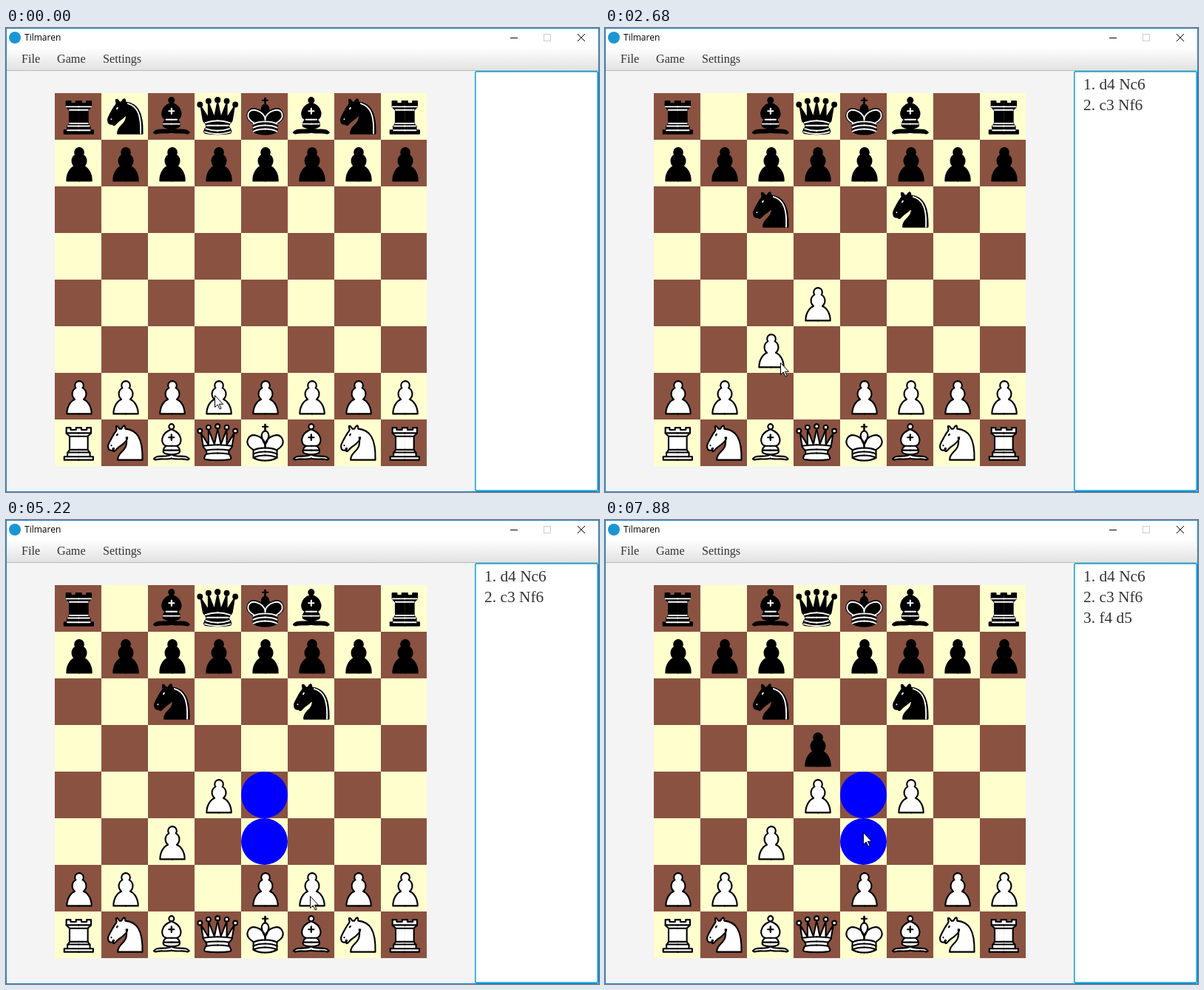
These frames come from a looping animation (802 by 627 pixels, 8 s). An HTML page:

```html
<!DOCTYPE html>
<html lang="en">
<head>
<meta charset="utf-8">
<title>Chess</title>
<style>
  html, body { margin: 0; width: 100%; height: 100%; overflow: hidden; background: #f4f4f4; }
  svg { display: block; }
  .title { font: 12px "Open Sans", sans-serif; }
  .menu { font: 16.2px "Liberation Serif", serif; fill: #333; }
  .moves { font: 21.4px "Liberation Serif", serif; fill: #333; }
  .piece { stroke: #000; stroke-width: 1.45; stroke-linecap: round; stroke-linejoin: round; }
  .white { fill: #fff; }
  .black { fill: #000; }
  .detail { fill: none; }
  .black .detail { stroke: #fff; stroke-width: 1.3; }
</style>
</head>
<body>
<svg width="802" height="627">
  <defs>
    <linearGradient id="bar" x2="0" y2="1">
      <stop stop-color="#fdfdfd"/><stop offset="1" stop-color="#e2e2e2"/>
    </linearGradient>
  </defs>
  <rect width="802" height="28" fill="#fff"/>
  <circle cx="12" cy="13" r="8" fill="#1b96d1"/>
  <text class="title" x="25" y="17">Tilmaren</text>
  <path d="M682 13.5h10M773 8l10 10m0-10l-10 10" stroke="#000"/>
  <rect x="727.5" y="8.5" width="9" height="9" fill="none" stroke="#ccc"/>
  <rect y="28" width="802" height="29" fill="url(#bar)"/>
  <rect y="57" width="802" height="1" fill="#b8b8b8"/>
  <g class="menu">
    <text x="21" y="47">File</text><text x="69" y="47">Game</text><text x="131" y="47">Settings</text>
  </g>
  <rect x="634.7" y="58.7" width="165.6" height="566.6" rx="2" fill="#fff" stroke="#039ed3" stroke-width="1.4"/>
  <rect x="636" y="60" width="163" height="564" fill="none" stroke="#039ed3" stroke-opacity=".13"/>
  <rect x=".5" y=".5" width="801" height="626" fill="none" stroke="#1883d7"/>
  <g id="board" shape-rendering="crispEdges"></g>
  <g id="pieces"></g>
  <g id="hints" fill="#00f"></g>
  <g id="moves" class="moves"></g>
  <path id="cursor" d="M.5.5v16l3.7-3.5 2.9 6 2-1-2.7-5.7h5.1z" fill="#fff" stroke="#000"/>
</svg>
<script>
const CELL = 63, LEFT = 66, TOP = 88, LOOP = 8000, FILES = 'abcdefgh';

const ball = (x, y) => `M${x - 2} ${y}a2 2 0 1 1 4 0 2 2 0 1 1-4 0z`;
const turret = 'M11 14h11.6M14 17h8.6M14 29.5h8.6M12.5 32h10.1M12 36h10.6';
const collar = 'M17.5 26h5.1M15 30h7.6M22.5 15.5v5M20 18h2.6';
const band = 'c3-1.5 7-2.2 11.1-2.2';
const bands = `M11.5 30${band}M11.5 33.5${band}M11.5 37${band}`;

// Left halves on a 45-unit square, mirrored when drawn; only the knight is whole.
const shapes = {
  p: { dx: 0, body: 'M22.6 9c-2.3 0-4.1 1.8-4.1 4 0 .9.3 1.7.8 2.4C17.3 16.5 16 18.6 16 21c0 2 .9 3.8 2.4 5-3 1.1-7.4 5.6-7.4 13.5h11.6',
       light: '', dark: '' },
  r: { dx: -.7, body: 'M22.6 9H20v2h-5V9h-4v5l3 3v12.5L12.5 32H12v4H9v3h13.6', light: turret, dark: turret },
  n: { dx: 0, body: 'M22 10c10.5 1 16.5 8 16 29H15c0-9 10-6.5 8-21M24 18c.4 3-5.5 7.4-8 9-3 2-2.8 4.3-5 4-1-1 1.4-3 0-3-1 0 .2 1.2-1 2-1 0-4 1-4-4 0-2 6-12 6-12s1.9-1.9 2-3.5c-.7-1-.5-2-.5-3 1-1 3 2.5 3 2.5h2s.8-2 2.5-3c1 0 1 3 1 3',
       light: 'M9 25.5v.1M14.8 15l-.6 1', dark: 'M9 25.5v.1M14.8 15l-.6 1M24.5 11c9.5 2.5 12.5 12 11.8 28' },
  b: { dx: -1.2, body: 'M22.6 34c-3.5 2.4-10.1 1-13.6 2 0 0-1.6.5-3 2 .7 1 1.7 1 3 .5 3.4-1 10.1.5 13.6-1M22.6 10.5c-11 4-10.6 14-5.1 15.5 0 0-2.5 1.5-2.5 4 0 0-.5.5 0 2 1.2 1.3 4.4 1.9 7.6 1.9M22.6 5.5a2.5 2.5 0 0 0 0 5',
       light: collar, dark: collar },
  q: { dx: -1.8, body: 'M22.6 9.5l-3.1 15L14 10.5V25L7 14l2 12c0 2 1.5 2 2.5 4 1 1.5 1 1 .5 3.5-1.5 1-1.5 2.5-1.5 2.5-1.5 1.5.5 2.5.5 2.5 3.2.5 7.5.8 11.6.8' + ball(6, 12) + ball(14, 8.7) + ball(22.5, 7.7),
       light: 'M9 26c3.5-.7 8.5-1.1 13.6-1.1M11.5 30c2.5-.5 7-.8 11.1-.8M12 33.5c3-.5 7-.8 10.6-.8',
       dark: 'M11 29a35 35 0 0 1 11.6-2M12.5 31.5h10.1M11.5 34.5a35 35 0 0 0 11.1 1.8M10.5 37.5a35 35 0 0 0 12.1 1.8' },
  k: { dx: -.5, body: 'M22.6 6v5.6M20 8h2.6M22.6 12c-2 0-3.1 2.5-3.1 2.5-1.5 3 3.1 10.5 3.1 10.5M22.6 23.5c-3.5-7.5-13.1-10.5-16.1-4-3 6 5 10 5 10V37c3 1.8 7 2.6 11.1 2.6',
       light: 'M22.5 23.5V27' + bands, dark: 'M22.5 26v-1.5C20 18 9.9 14 7 19.9c-2.5 5.6 4.9 9 4.9 9' + bands },
};

// Each turn: a piece is picked up, then the move and its reply land together.
const turns = [
  { pick: 450, drop: 1340, move: 'd2d4', reply: 'b8c6', text: '1. d4 Nc6' },
  { pick: 2100, drop: 2680, move: 'c2c3', reply: 'g8f6', text: '2. c3 Nf6' },
  { pick: 3930, drop: 5300, move: 'e2' },
  { pick: 5300, drop: 6030, move: 'f2f4', reply: 'd7d5', text: '3. f4 d5' },
  { pick: 6700, drop: LOOP, move: 'e2' },
];

// Pointer legs: start and end time, then where the tip arrives.
const legs = [
  [0, 0, 282, 496], [60, 200, 278, 498], [450, 800, 287, 378],
  [1650, 1770, 308, 469], [1770, 2100, 228, 515], [2100, 2340, 237, 452],
  [2930, 3260, 419, 400], [3260, 3590, 349, 477], [3930, 4130, 350, 430],
  [4820, 5220, 411, 508], [5220, 5610, 399, 380],
  [6270, 6400, 378, 466], [6400, 6700, 350, 490], [6700, 7040, 350, 444], [7650, 7880, 349, 422],
];

const find = id => document.getElementById(id);
const corner = square => [LEFT + FILES.indexOf(square[0]) * CELL, TOP + (8 - square[1]) * CELL];
const show = (el, on) => el.setAttribute('visibility', on ? 'visible' : 'hidden');

function add(parent, tag, attrs, content = '') {
  const el = document.createElementNS('http://www.w3.org/2000/svg', tag);
  for (const name in attrs) el.setAttribute(name, attrs[name]);
  el.innerHTML = content;
  return find(parent).appendChild(el);
}

const pieces = [];
function addPiece(kind, color, home) {
  const { dx, body, light, dark } = shapes[kind];
  const draw = attrs => ['', kind === 'n' ? null : 'translate(45) scale(-1 1)']
    .map(flip => flip === null ? '' : `<path ${attrs} transform="${flip}"/>`).join('');
  const content = draw(`d="${body}"`) + draw(`class="detail" d="${color === 'white' ? light : dark}"`);
  pieces.push({ dx, home, el: add('pieces', 'g', { class: 'piece ' + color }, content) });
}

[...FILES].forEach((file, col) => {
  for (let rank = 1; rank <= 8; rank++) {
    const [x, y] = corner(file + rank);
    add('board', 'rect', { x, y, width: col < 7 ? CELL : CELL - 1, height: CELL, fill: (col + rank) % 2 ? '#ffffce' : '#8a5241' });
  }
  const kind = 'rnbqkbnr'[col];
  addPiece(kind, 'black', file + 8);
  addPiece('p', 'black', file + 7);
  addPiece('p', 'white', file + 2);
  addPiece(kind, 'white', file + 1);
});
const played = turns.filter(turn => turn.text);
played.forEach((turn, i) => turn.line = add('moves', 'text', { x: 647, y: 83 + 28 * i }, turn.text));
const hints = [3, 4].map(rank => ({ rank, el: add('hints', 'circle', { r: CELL / 2 }) }));

function pointerAt(t) {
  const i = legs.findLastIndex(leg => leg[0] <= t);
  const [start, end, x, y] = legs[i];
  const [, , x0, y0] = legs[Math.max(i - 1, 0)];
  const k = Math.min((t - start) / (end - start || 1), 1);
  return i ? [Math.round(x0 + (x - x0) * k), Math.round(y0 + (y - y0) * k)] : [x, y];
}

function draw(t) {
  const done = played.filter(turn => t >= turn.drop).flatMap(turn => [turn.move, turn.reply]);
  for (const { el, dx, home } of pieces) {
    const move = done.find(m => m.startsWith(home));
    const [x, y] = corner(move ? move.slice(2) : home);
    el.setAttribute('transform', `translate(${x + .4 + dx} ${y - 1.9}) scale(1.45)`);
  }
  for (const turn of played) show(turn.line, t >= turn.drop);

  const active = turns.find(turn => t >= turn.pick && t < turn.drop);
  for (const { el, rank } of hints) {
    show(el, active);
    if (!active) continue;
    const [x, y] = corner(active.move[0] + rank);
    el.setAttribute('cx', x + CELL / 2);
    el.setAttribute('cy', y + CELL / 2);
  }
  find('cursor').setAttribute('transform', `translate(${pointerAt(t)})`);
}

const start = performance.now();
(function tick() {
  draw((performance.now() - start) % LOOP);
  requestAnimationFrame(tick);
})();
</script>
</body>
</html>
```
